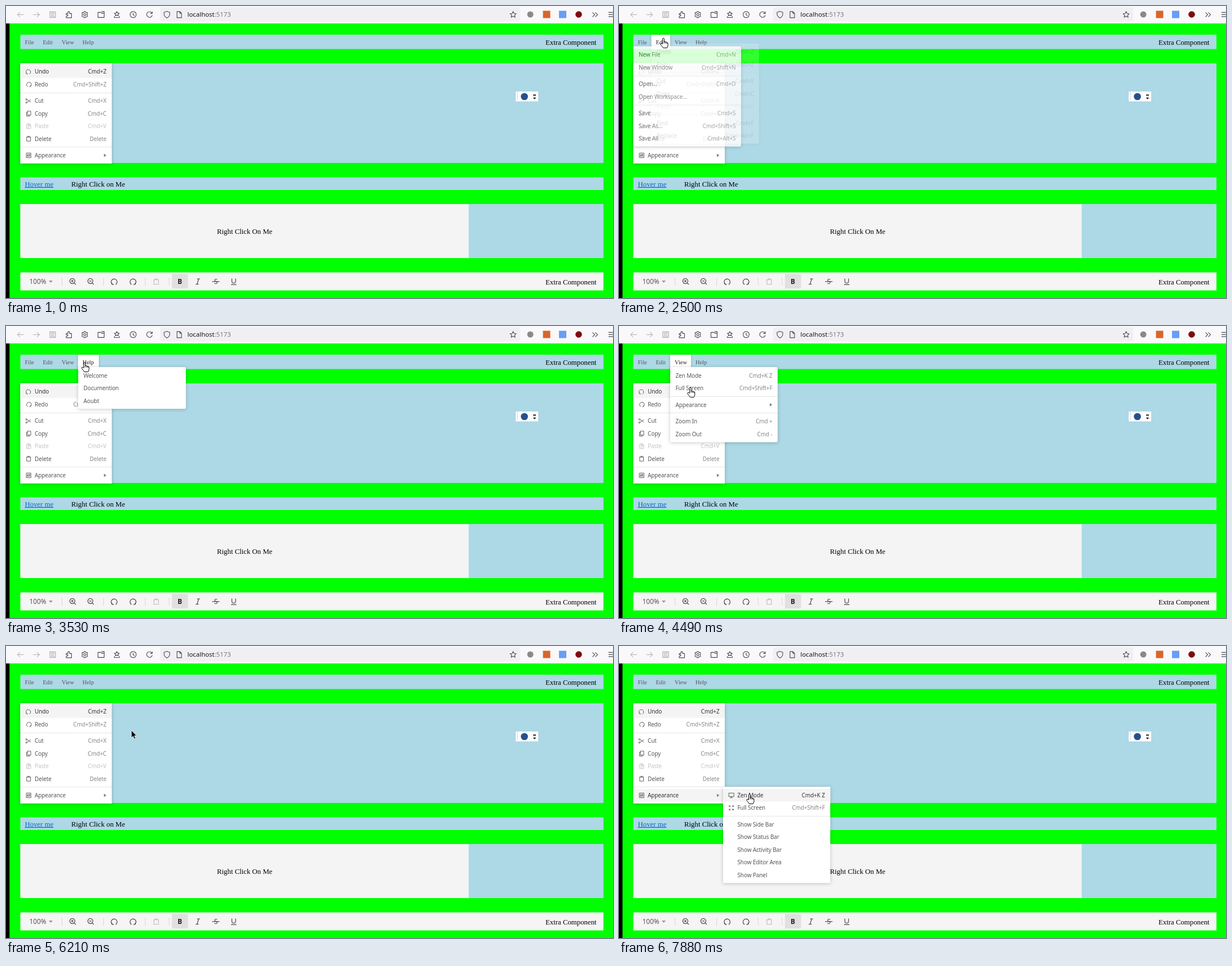
Write an HTML page that moves like this. It is 1079 px wide and 519 px high and loops after 8 s.

```html
<!DOCTYPE html>
<html lang="en">
<head>
<meta charset="utf-8">
<title>Menu demo</title>
<style>
html, body { margin: 0; width: 100%; height: 100%; overflow: hidden; background: #0f0; }
svg { display: block; }
text { white-space: pre; }
.sans { font-family: "Noto Sans", "Open Sans", sans-serif; }
.menu text { font: 10px "Noto Sans", "Open Sans", sans-serif; letter-spacing: -.12px; fill: #565656; }
.menu text.key { fill: #868686; text-anchor: end; }
.menu .off text { fill: #c4c4c4; }
.menu .on > rect { fill: #f4f4f4; }
.menu .on text { fill: #333; }
.menu .box { filter: drop-shadow(0 1px 3px rgba(0, 0, 0, .22)); }
.serif { font: 12.8px "Liberation Serif", "Times New Roman", serif; }
.tab text { font: 10.4px "Liberation Serif", "Times New Roman", serif; fill: #555; }
.tab.on text { fill: #222; }
.tab rect { fill: none; }
.tab.on rect { fill: #fff; filter: drop-shadow(0 0 2px rgba(0, 0, 0, .2)); }
</style>
</head>
<body>
<svg id="stage" width="1079" height="519" viewBox="0 0 1079 519"></svg>
<script>
const stage = document.getElementById('stage');

// Line icons, centred on 0,0 in a box of about 10 units
const ICONS = {
  undo: 'M-1.3 4.2H-3.8V1.8M-3.5 3.9A4.4 4.4 0 1 1 2.4 3.7L1.5 4.3',
  redo: 'M1.3 4.2H3.8V1.8M3.5 3.9A4.4 4.4 0 1 0-2.4 3.7L-1.5 4.3',
  cut: 'M-4-3.6L4 2.6M-4 3.6L4-2.6M-4.2-4.2a1.4 1.4 0 1 0 .1 0M-4.2 1.6a1.4 1.4 0 1 0 .1 0',
  copy: 'M-2-4.5H4V3H-2ZM-2-2.5H-4V4.8H2V3',
  paste: 'M-2-3.5H-4V4.5H-1M-2-4.5H2V-2.5H-2ZM2-3.5H3.6V-1M-1-1H4V4.6H-1ZM1 1H2.5',
  trash: 'M-4.5-3H4.5M-1.5-3V-4.6H1.5V-3M-3.6-3V4.5H3.6V-3',
  panel: 'M-4.3-4.3H4.3V4.3H-4.3ZM-2-2.5V2.5M0-2.5V2.5M2-2.5V2.5M-3 1H-1M1-1H3',
  screen: 'M-4.8-4H4.8V2.3H-4.8ZM0 2.3V4.5M-2.5 4.5H2.5',
  full: 'M-4-4L-1.4-1.4M-4-1.8V-4H-1.8M4-4L1.4-1.4M1.8-4H4V-1.8M-4 4L-1.4 1.4M-4 1.8V4H-1.8M4 4L1.4 1.4M1.8 4H4V1.8',
  lens: 'M-.6-4.7a4.1 4.1 0 1 0 .1 0M2.4 2.4L5 5M-2.6-.6H1.4',
  plus: 'M-.6-2.6V1.4',
  back: 'M5.5 0H-5M-1-4.5L-5.5 0L-1 4.5',
  fwd: 'M-5.5 0H5M1-4.5L5.5 0L1 4.5',
  reader: 'M-5-5H5V5H-5ZM-3-2.5H3M-3 0H0M-3 2.5H3M1.5 0H3',
  puzzle: 'M-5-2H-2V-4.5Q-.5-6.5 1-4.5V-2H4.5V5.5H-5V3Q-2 2.6-2 1Q-2 0-5 0Z',
  gear: 'M0-5.8L1.8-4.2L4.8-3.4L4.4 0L4.8 3.4L1.8 4.2L0 5.8L-1.8 4.2L-4.8 3.4L-4.4 0L-4.8-3.4L-1.8-4.2ZM0-2a2 2 0 1 0 .1 0',
  folder: 'M-5.5-4H0L1-2.5H5.5V5H-5.5ZM1-5.5H5.5V-2.5',
  star: 'M0-5.5L1.7-2L5.5-1.6L2.7 1L3.5 4.8L0 2.9L-3.5 4.8L-2.7 1L-5.5-1.6L-1.7-2Z',
  tray: 'M0-5.5L1.3-2.7L4.3-2.4L2 0L2.7 2.2L0 1L-2.7 2.2L-2 0L-4.3-2.4L-1.3-2.7ZM-4.5 3V5.2H4.5V3',
  clock: 'M0-5.5a5.5 5.5 0 1 0 .1 0M0-3V.5L2.5 1.8',
  reload: 'M4.5-2.5A5 5 0 1 0 5 1M5-5.5V-2H1.5',
  shield: 'M0-5.8L5-4V0Q4.5 4 0 5.8Q-4.5 4-5-.5V-4Z',
  doc: 'M-4-5.5H1L4-2.5V5.5H-4ZM1-5.5V-2.5H4',
  more: 'M-4.5-4L-.5 0L-4.5 4M.5-4L4.5 0L.5 4',
  bars: 'M-4-4H6M-4-.2H6M-4 3.6H6',
};

const icon = (name, x, y, color = '#555', scale = 1, width = 1) =>
  `<path d="${ICONS[name]}" transform="translate(${x} ${y}) scale(${scale})" fill="none" stroke="${color}" stroke-width="${width}" stroke-linejoin="round"/>`;
const rect = (x, y, w, h, fill, extra = '') =>
  `<rect x="${x}" y="${y}" width="${w}" height="${h}" fill="${fill}" ${extra}/>`;
const dot = (x, y, r, fill) => `<circle cx="${x}" cy="${y}" r="${r}" fill="${fill}"/>`;
const serif = (x, y, s, extra = '') => `<text class="serif" x="${x}" y="${y}" ${extra}>${s}</text>`;

// Item: "label|shortcut|icon", ">" as shortcut draws an arrow, "-" is a rule
function menu(id, x, top, w, indent, items, radius = 3) {
  let y = top + 15, rows = '', count = 0;
  const right = x + w - 9.5;
  for (const item of items) {
    if (item === '-') {
      rows += rect(x, Math.round(y - 8), w, 1, '#e6e6e6');
      y += 7.2;
      continue;
    }
    const [label, key, glyph] = item.split('|');
    const off = label === 'Paste';
    rows += `<g id="${id}${count++}" class="${off ? 'off' : ''}">` +
      rect(x, y - 11.2, w, 22.4, 'none') +
      (glyph ? icon(glyph, x + 14.7, y, off ? '#c4c4c4' : '#555', .95) : '') +
      `<text x="${x + indent}" y="${y + 3.7}">${label}</text>` +
      (key === '>' ? `<path d="M${right - 4.5} ${y - 3}l4.5 3l-4.5 3z" fill="#888"/>`
        : key ? `<text class="key" x="${right}" y="${y + 3.7}">${key}</text>` : '') + '</g>';
    y += 22.4;
  }
  return `<g id="${id}" class="menu">` +
    rect(x, top, w, y - 8 - top, '#fff', `rx="${radius}" class="box"`) + rows + '</g>';
}

const tab = (id, x, w, label) =>
  `<g id="${id}" class="tab">${rect(x, 51, w, 26, '')}<text x="${x + 8}" y="68">${label}</text></g>`;

const PANELS = ['Show Side Bar', 'Show Status Bar', 'Show Activity Bar', 'Show Editor Area', 'Show Panel'];
const BLUE = '#add8e6';

const browser = rect(0, 0, 1079, 31, '#f9f9fb') +
  rect(274, 2.5, 640, 25, '#f0f0f4', 'rx="4"') +
  [['back', 26, '#bbb'], ['fwd', 54, '#bbb'], ['reader', 83, '#aaa'], ['puzzle', 112], ['gear', 140],
   ['folder', 169], ['tray', 197], ['clock', 226], ['reload', 255], ['shield', 286], ['doc', 308],
   ['star', 901.5], ['more', 1047], ['bars', 1075]]
    .map(([n, x, c]) => icon(n, x, 15.3, c || '#4a4a52', 1, 1.15)).join('') +
  '<text class="sans" x="322.5" y="19.2" font-size="11.4" fill="#15141a">localhost<tspan fill="#75757d">:5173</tspan></text>' +
  dot(932, 15, 5.5, '#8a8a8a') + rect(954.5, 8.5, 13, 13, '#d9662b') +
  rect(983, 8.5, 13, 13, '#669df6') + dot(1018, 15, 5.8, '#800610');

const page = rect(0, 31, 6.5, 488, '#000') + rect(6.5, 31, 1073, 488, '#0f0') +
  rect(25.5, 51, 1036.5, 25.5, BLUE) + rect(25.5, 102, 1036.5, 177, BLUE) +
  rect(25.5, 304.5, 1036.5, 22.5, BLUE) + rect(25.5, 352, 1036.5, 96, BLUE) +
  rect(25.5, 352, 797, 96, '#f4f4f4') + rect(25.5, 473.5, 1036.5, 32, '#f5f5f5') +
  serif(959, 69, 'Extra Component') + serif(959, 494.5, 'Extra Component') +
  serif(33.5, 320.8, 'Hover me', 'fill="#0a66c8" text-decoration="underline"') +
  serif(116, 320.8, 'Right Click on Me') + serif(375, 405.3, 'Right Click On Me');

const letter = (s, x, style) =>
  `<text class="sans" x="${x}" y="494" font-size="12" text-anchor="middle" fill="#444" style="${style}">${s}</text>`;
const tools = '<text class="sans" x="41.5" y="494.3" font-size="11.8" fill="#555">100%</text>' +
  '<path d="M76 488h7l-3.500 4z" fill="#999"/>' +
  [99, 173, 247, 289.500].map(x => rect(x, 483, 1, 14, '#d8d8d8')).join('') +
  icon('lens', 118.5, 489.5, '#444', 1.1) + icon('plus', 118.5, 489.5, '#444', 1.1) +
  icon('lens', 150.5, 489.5, '#444', 1.1) +
  icon('undo', 193, 489.8, '#444', 1.2) + icon('redo', 225, 489.8, '#444', 1.2) +
  icon('trash', 267, 489.8, '#bbb', 1.1) + rect(295, 476.5, 28.5, 25.5, '#e0e0e0', 'rx="2"') +
  letter('B', 309, 'font-weight:700;fill:#222') +
  '<path d="M339.500 485h5.500M337 494.500h5.500M342.500 485l-2.800 9.500" fill="none" stroke="#444" stroke-width="1.2"/>' +
  letter('S', 373, '') + rect(366.5, 489.2, 13, 1.2, '#444') +
  '<path d="M401.500 484.500v4.500q0 3.500 3.300 3.500t3.300-3.500v-4.500M400 495.200h9.600" fill="none" stroke="#444" stroke-width="1.2"/>';

const langBar = '<rect id="langBox" x="906" y="152" height="17.5" fill="#fff"/>' +
  '<path d="M909.500 154v14" stroke="#999" stroke-dasharray="1 2"/>' + dot(921.5, 161, 6.3, '#25508c') +
  '<g id="langMore"><text x="933.500" y="165.500" font-size="12.5" font-weight="700" fill="#777" font-family="Noto Sans CJK SC, Noto Sans CJK, sans-serif">英</text>' +
  '<path d="M958.500 155.500a5.800 5.800 0 1 1-8.500 8.500q7 0 8.500-8.500z" fill="#888"/>' +
  '<path d="M969 157.500a1.500 1.500 0 1 0 .1 0M973.500 161q3.500 2-.5 5" fill="none" stroke="#777" stroke-width="1.3"/>' +
  rect(981.500, 157, 12.5, 8.5, '#888') +
  '<path d="M983 159.500h9.500M983 161.500h9.500M985 163.700h5.500" stroke="#eee" stroke-dasharray="1.5 .8"/>' +
  icon('gear', 1004, 161, '#777', .95, 1.7) +
  rect(1018.5, 155, 4.5, 8, '#888', 'rx="2.200"') +
  '<path d="M1015.500 160.500q0 4.500 5.200 4.500t5.200-4.500M1020.700 165v2.500" fill="none" stroke="#777" stroke-width="1.2"/></g>' +
  '<path id="langEnd" d="M1034 157.500h5v1.800h-5zM1033.800 162.800h5.400l-2.700 3z"/>';

stage.innerHTML = page + browser + tools +
  tab('tFile', 25.5, 32, 'File') + tab('tEdit', 57.5, 33.5, 'Edit') +
  tab('tView', 91, 37, 'View') + tab('tHelp', 128, 37, 'Help') +
  menu('ctx', 25.5, 101.7, 162.5, 25.5, ['Undo|Cmd+Z|undo', 'Redo|Cmd+Shift+Z|redo', '-', 'Cut|Cmd+X|cut',
    'Copy|Cmd+C|copy', 'Paste|Cmd+V|paste', 'Delete|Delete|trash', '-', 'Appearance|>|panel'], 0) +
  langBar +
  menu('mFile', 25.5, 73, 191.5, 9.5, ['New File|Cmd+N', 'New Window|Cmd+Shift+N', '-', 'Open...|Cmd+O',
    'Open Workspace...', '-', 'Save|Cmd+S', 'Save As...|Cmd+Shift+S', 'Save All|Cmd+Alt+S']) +
  menu('mEdit', 57.5, 73, 191.5, 9.5, ['Undo|Cmd+Z', 'Redo|Cmd+Shift+Z', '-', 'Cut|Cmd+X', 'Copy|Cmd+C',
    'Paste|Cmd+V', '-', 'Find|Cmd+F', 'Replace|Cmd+Alt+F']) +
  menu('mView', 91, 73, 191, 9.5, ['Zen Mode|Cmd+K Z', 'Full Screen|Cmd+Shift+F', '-', 'Appearance|>', '-',
    'Zoom In|Cmd +', 'Zoom Out|Cmd -']) +
  menu('mHelp', 128.3, 73, 191.5, 9.5, ['Welcome', 'Documention', 'Aoubt']) +
  menu('viewSub', 279.3, 125, 159, 9.5, PANELS) +
  menu('ctxSub', 185, 250.3, 190.5, 25.5, ['Zen Mode|Cmd+K Z|screen', 'Full Screen|Cmd+Shift+F|full', '-', ...PANELS], 1) +
  '<g id="cursor"><path id="arrow" d="M0 0V13L3 10.300L5.200 15L7.300 14L5.200 9.500H9Z" stroke="#fff" stroke-width=".7"/>' +
  '<path id="hand" d="M-1.400 10.500V1.500A1.350 1.350 0 0 1 1.300 1.500V6.500Q3.800 5.400 4 7.300Q6.200 6.400 6.300 8.200Q8 7.600 8 9.300V12.500Q8 15 6.300 17.500H-.5Q-2.500 14-5 11.500Q-5.300 9-3 9.300ZM1.300 6.500V9.500M4 7.300V9.800M6.300 8.200V10" fill="#fff" stroke="#000"/></g>';

const el = id => document.getElementById(id);
const clamp = v => Math.max(0, Math.min(1, v));

// Screen updates: first, last, number
const UPDATES = [[220, 990, 11], [1080, 1230, 3], [1310, 1850, 8], [1930, 2010, 2], [2160, 2500, 5],
  [2590, 2880, 5], [2970, 3530, 8], [3610, 3690, 2], [3920, 4640, 10], [4730, 5110, 6], [5340, 5480, 3],
  [5570, 5670, 2], [5820, 6210, 6], [6280, 6360, 2], [6610, 7320, 10], [7320, 7420, 2], [7800, 7880, 2]];

function snap(t) {
  let s = 0;
  for (const [a, b, n] of UPDATES) {
    if (t < a) break;
    const step = (b - a) / (n - 1);
    s = a + step * Math.min(n - 1, Math.floor((t - a) / step + 1e-6));
  }
  return s;
}

// Pointer: time, x, y
const PATH = [[220, 1068, 483], [374, 985, 260], [451, 935, 162], [528, 915, 160], [759, 440, 140],
  [990, 228, 115], [1080, 215, 106], [1155, 187, 92], [1230, 198, 76], [1310, 178, 68], [1850, 44, 66],
  [1930, 44, 56], [2010, 43, 52], [2330, 43, 52], [2500, 79, 57], [2880, 80, 58], [3290, 139, 64],
  [3690, 140, 64], [4000, 112, 66], [4240, 110, 70], [4640, 138, 135], [5110, 250, 138], [5340, 400, 144],
  [5480, 520, 148], [5670, 560, 150], [5820, 540, 152], [6210, 223, 150], [6360, 175, 185],
  [6610, 160, 215], [6930, 155, 260], [7320, 169, 264], [7700, 169, 264], [7800, 205, 263], [7880, 232, 263]];

function pointer(t) {
  const i = PATH.findIndex(p => p[0] > t);
  if (i < 1) return PATH[i < 0 ? PATH.length - 1 : 0].slice(1);
  const [a, b] = [PATH[i - 1], PATH[i]], k = (t - a[0]) / (b[0] - a[0]);
  return [a[1] + (b[1] - a[1]) * k, a[2] + (b[2] - a[2]) * k];
}

// Menus: id, slide direction, open/close times
const FADE = 300, SLIDE = 8;
const MENUS = [
  ['mFile', 0, -1, [[2080, 2445]]], ['mEdit', 0, -1, [[2445, 2930]]],
  ['mView', 0, -1, [[2930, 3200], [3880, 5780]]], ['mHelp', 0, -1, [[3200, 3880]]],
  ['viewSub', -1, 0, [[4680, 5405]]], ['ctxSub', 1, 0, [[7080, 9000]]],
];

const mark = (id, on) => el(id).classList.toggle('on', on);
const show = (id, on) => { el(id).style.display = on ? '' : 'none'; };

function draw(now) {
  const t = snap(now % 8000);
  for (const [id, dx, dy, spans] of MENUS) {
    const o = Math.max(...spans.map(([a, b]) => clamp(clamp((t - a) / FADE) - clamp((t - b) / FADE))));
    show(id, o > 0);
    el(id).style.opacity = o;
    el(id).setAttribute('transform', `translate(${dx * SLIDE * (1 - o)} ${dy * SLIDE * (1 - o)})`);
    if (id[0] === 'm') mark('t' + id.slice(1), spans.some(([a, b]) => t >= a && t < b));
  }

  const [x, y] = pointer(t);
  show('cursor', t >= 220);
  el('cursor').setAttribute('transform', `translate(${x} ${y})`);
  const hand = t >= 1500 && t < 5250 || t >= 6350;
  show('hand', hand);
  show('arrow', !hand);

  const over = t >= 6350;
  mark('ctx0', true);
  mark('ctx5', over && y > 225 && y < 247);
  mark('ctx6', over && y > 254);
  mark('mView2', t >= 4560 && t < 5400);
  mark('ctxSub0', t >= 7800);

  const wide = t >= 450 && t < 2320;
  show('langMore', wide);
  el('langBox').setAttribute('width', wide ? 137 : 40);
  el('langEnd').setAttribute('transform', `translate(${wide ? 0 : -97} 0)`);
}

function loop(now) {
  draw(now);
  requestAnimationFrame(loop);
}
draw(0);
requestAnimationFrame(loop);
</script>
</body>
</html>
```
